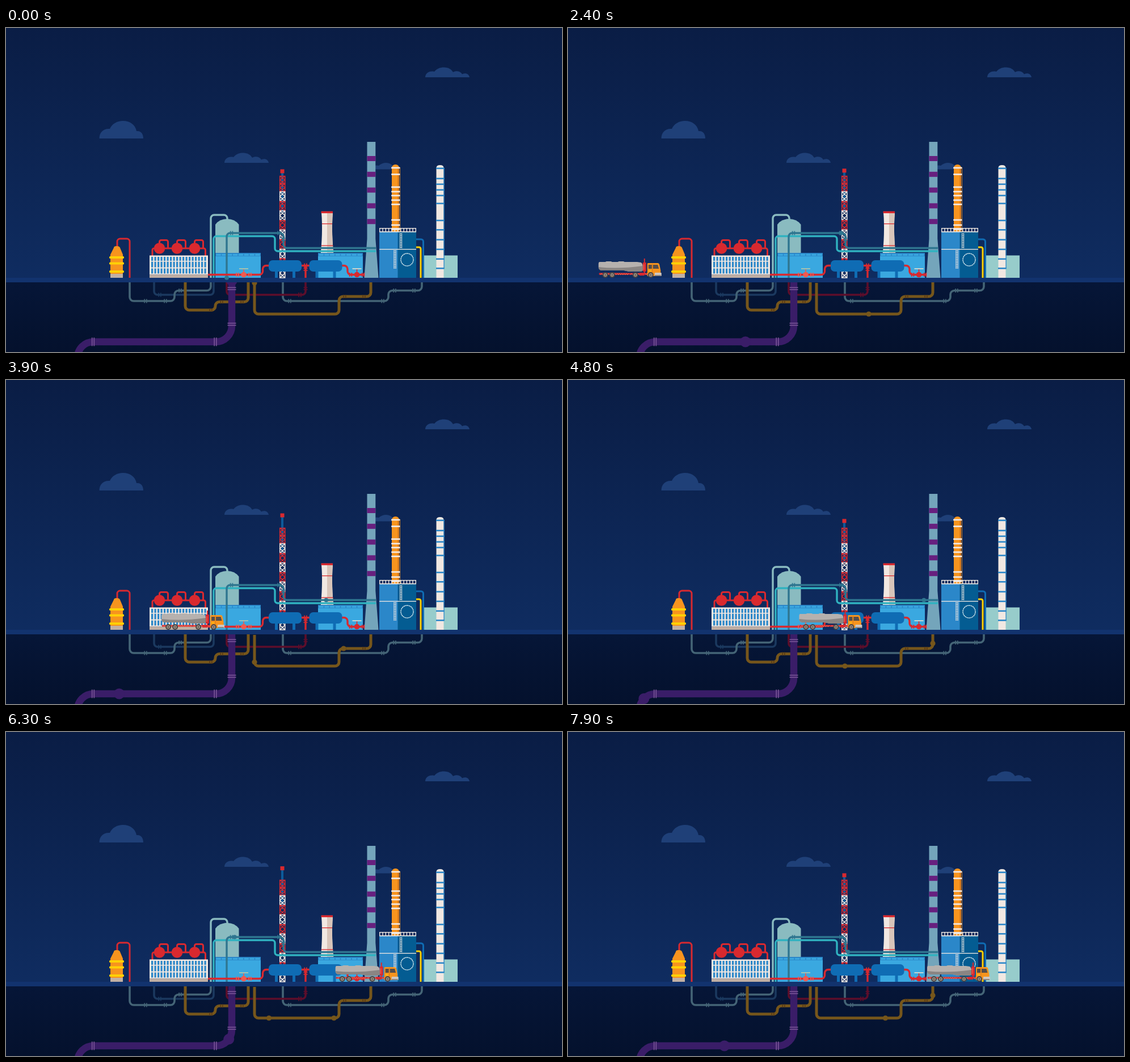
These frames come from a looping animation (980 px wide and 572 px high, 8 s). An HTML page:

```html
<!DOCTYPE html>
<html lang="en">
<head>
<meta charset="utf-8">
<title>Refinery</title>
<style>
html, body { margin: 0; width: 100%; height: 100%; overflow: hidden; background: #0a1e46; }
svg { display: block; }
</style>
</head>
<body>
<svg id="stage" width="980" height="572" viewBox="0 0 980 572"></svg>
<script>
const RED = '#d9292f', WHITE = '#f1e8e2', BLUE = '#2b87c9', DEEP = '#0f6cb4', SKY = '#3aa8e0',
  ORANGE = '#f7941e', YELLOW = '#ffd105', SAGE = '#8abbc0', CYAN = '#30b2c0', TEAL = '#2f7690',
  SLATE = '#446476', NAVY = '#1b395f', BROWN = '#76561b', WINE = '#5d0e2b', PURPLE = '#3a1d68',
  CLOUD = '#1f4078';

const range = (n, f) => Array.from({ length: n }, (_, i) => f(i)).join('');
const rect = (c, x, y, w, h, r = 0) => `<rect fill="${c}" x="${x}" y="${y}" width="${w}" height="${h}" rx="${r}"/>`;
const disc = (c, x, y, r) => `<circle fill="${c}" cx="${x}" cy="${y}" r="${r}"/>`;
const shape = (c, d) => `<path fill="${c}" d="${d}"/>`;
const line = (c, w, d) => `<path fill="none" stroke="${c}" stroke-width="${w}" d="${d}"/>`;

// Polyline with corners rounded by radius r
function bend(pts, r) {
  let d = 'M' + pts[0];
  for (let i = 1; i < pts.length - 1; i++) {
    const [x, y] = pts[i];
    const toward = ([px, py]) => [Math.sign(px - x), Math.sign(py - y)];
    const a = toward(pts[i - 1]), b = toward(pts[i + 1]);
    const sweep = a[0] * b[1] - a[1] * b[0] < 0 ? 1 : 0;
    d += `L${x + a[0] * r} ${y + a[1] * r}A${r} ${r} 0 0 ${sweep} ${x + b[0] * r} ${y + b[1] * r}`;
  }
  return d + 'L' + pts[pts.length - 1];
}
const pipe = (c, w, r, ...pts) => line(c, w, bend(pts, r));
const flangeX = (c, y, h, ...xs) => xs.map(x => rect(c, x - 2.7, y - h / 2, 1.8, h) + rect(c, x + .9, y - h / 2, 1.8, h)).join('');
const flangeY = (c, x, w, ...ys) => ys.map(y => rect(c, x - w / 2, y - 2.7, w, 1.8) + rect(c, x - w / 2, y + .9, w, 1.8)).join('');

const longCloud = (x, y) => `<g transform="translate(${x} ${y})">` + shape(CLOUD,
  'M0 0C0 -7 7 -12 16 -10C21 -16 27 -17.5 33 -17.5C41 -17.5 46 -14 49 -9C54 -12 62 -11 65 -5.500C71 -8.500 77 -6 78 0Z') + '</g>';

function clouds() {
  return shape(CLOUD, 'M164.500 195C164.500 184 172 177 183 178C187 169 196 164 206 164C219 164 228 171 230 182C238 181 242 187 242 195Z')
    + longCloud(385, 238) + longCloud(739, 87)
    + shape(CLOUD, 'M640 249.500Q646 241 657 243Q663 238 670 238Q678 238 682 244L690 249.500Z');
}

const purplePath = bend([[398, 446], [398, 554], [126, 554], [126, 600]], 28);
const brownPath = bend([[438, 450], [438, 505], [587, 505], [587, 474], [643, 474], [643, 446]], 7);
const tealPath = bend([[389, 441], [389, 362], [489, 362], [489, 388.5], [652, 388.5]], 6);

function underground() {
  const gray = x => pipe(SLATE, 3.6, 7, [x, 447], [x, 482], [x === 218 ? 297 : 674, 482],
    [x === 218 ? 297 : 674, 463.5], [x === 218 ? 361 : 733, 463.5], [x === 218 ? 361 : 733, 447]);
  return rect('url(#soil)', 0, 441, 980, 131)
    + pipe(NAVY, 3.6, 6, [261, 447], [261, 471], [366, 471], [366, 447]) + flangeX(NAVY, 471, 7, 271)
    + gray(218) + flangeX(SLATE, 482, 7, 246, 281) + flangeX(SLATE, 463.5, 7, 307)
    + gray(488) + flangeX(SLATE, 482, 7, 500, 664) + flangeX(SLATE, 463.5, 7, 685, 719)
    + pipe(WINE, 3.6, 6, [389, 441], [389, 471], [528, 471], [528, 441])
    + flangeX(WINE, 471, 8, 518) + flangeY(WINE, 528, 7, 460)
    + pipe(BROWN, 5, 7, [316, 447], [316, 498], [369, 498], [369, 483.5], [427, 483.5], [427, 447])
    + flangeX('#593b18', 498, 6, 361) + flangeX('#593b18', 483.5, 6, 380, 416)
    + line(BROWN, 5, brownPath) + flangeX('#593b18', 474, 6, 597, 631)
    + '<g id="brown"></g>'
    + line(PURPLE, 12.5, purplePath) + '<g id="purple"></g>'
    + flangeY('#765294', 398, 15, 460, 523) + flangeX('#765294', 554, 15, 153.5, 369);
}

function capsule() {
  return pipe(RED, 3, 5, [196, 388], [196, 372], [218, 372], [218, 441])
    + shape(ORANGE, 'M190 388Q190 385 195 385Q200 385 201 388L206 400V434H184V400Z')
    + [403, 413.5, 428].map(y => rect(YELLOW, 182, y, 26, 4, 1.5)).join('')
    + rect('#c2b0a4', 184, 434, 22, 7);
}

function factory() {
  const rows = [[404, 7], [412.5, 10], [424.5, 9]];
  return pipe(RED, 3, 3, [258, 402], [258, 389], [351.5, 389], [351.5, 402])
    + [270.5, 301.5, 332.5].map(x =>
      pipe(RED, 3, 3, [x, 385], [x, 374.5], [x + 15, 374.5], [x + 15, 389]) + disc(RED, x, 389, 9.8)).join('')
    + rect(WHITE, 253, 401.5, 103, 34) + rect('#bfaea3', 253, 435.5, 103, 5.5)
    + rows.map(([y, h]) => range(18, i => rect(BLUE, 256 + i * 5.5, y, 3.2, h))).join('');
}

const shed = (x, w) => rect(SKY, x, 397, w, 44) + rect(BLUE, x, 397, w, 2)
  + rect(BLUE, x, 402, w, 1) + range(9, i => rect(BLUE, x + i * (w - 1.5) / 8, 397, 1.5, 6));

function coolingChimney() {
  return shape(WHITE, 'M556 326H576C574 350 575 380 578 404H554C557 380 558 350 556 326Z')
    + shape('#d8c5ba', 'M566 326H576C574 350 575 380 578 404H566Z')
    + rect(RED, 555.5, 323.5, 20.500, 3.5) + rect(RED, 557, 345, 18, 1.3) + rect(RED, 556, 383.500, 20.500, 1.3);
}

const stripedStack = () => shape('#74a5bb', 'M636.500 201H651.300V372L656.500 441H631.500L636.500 372Z')
  + range(5, i => rect('#67207f', 636.500, 226 + i * 27.8, 14.8, 9));

function reactor() {
  const ladder = (x, y, h) => rect(WHITE, x - 2, y, .9, h) + rect(WHITE, x + 1.2, y, .9, h)
    + range(Math.floor(h / 3), i => rect(WHITE, x - 2, y + 1 + i * 3, 4, .8));
  return rect(ORANGE, 680, 241, 13, 120, 6) + rect(ORANGE, 680, 300, 13, 61) + rect('#e07f1b', 690, 248, 3, 112)
    + rect(ORANGE, 694, 246, .8, 114)
    + [245.5, 257, 279.5, 287.5, 294.5, 302.5, 310, 337.500, 346.5, 354].map(y => rect(WHITE, 679, y, 15.5, 2.8, 1)).join('')
    + pipe(DEEP, 3, 4, [722, 373], [735.5, 373], [735.5, 441])
    + pipe(YELLOW, 3, 3, [722, 387], [731, 387], [731, 441])
    + rect(BLUE, 658, 360, 33, 81) + rect('#045c92', 690.5, 360, 32.5, 81)
    + rect(WHITE, 658, 353, 65, 1.4) + rect(WHITE, 658, 359, 65, 1.6)
    + range(13, i => rect(WHITE, 658 + i * 5.3, 353, 1.4, 7))
    + rect(WHITE, 658, 390, 65, 1.3)
    + ladder(696, 362, 27) + ladder(685.5, 392, 33)
    + '<circle cx="707" cy="409" r="11" fill="none" stroke="#dcebf0" stroke-width="1.4" stroke-dasharray="2.6 .6"/>';
}

function whiteColumn() {
  return rect('#97cccb', 737, 401.5, 59, 39.5)
    + shape(WHITE, 'M758.500 441V247Q758.500 242 765 242Q771.500 242 771.500 247V441Z')
    + [246.500, 264.500, 274.500, 284.500, 294.500, 308.5, 338.5, 355, 372.5, 389.5, 406.5, 423].map(y => rect(BLUE, 758, y, 14.5, 2.6)).join('')
    + rect(BLUE, 771.5, 247, 1.2, 178);
}

function rig() {
  const cell = (c, y, h) => line(c, 1.5, `M482.700 ${y}H491.800V${y + h}H482.700ZL491.800 ${y + h / 2}L482.700 ${y + h}M491.800 ${y}L482.700 ${y + h / 2}L491.800 ${y + h}`);
  return '<g id="rod">' + rect('#0d5b9b', 485, 6, 4, 70) + rect(RED, 483.5, 0, 7, 7) + '</g>'
    + cell(RED, 261.5, 13.500) + cell(RED, 275, 13.500)
    + range(9, i => cell(i % 2 ? RED : WHITE, 289 + i * 16.9, 16.9));
}

function tanks() {
  const tank = x => rect(DEEP, x + 11, 428, 5, 13) + rect(DEEP, x + 42, 428, 5, 13) + rect(DEEP, x, 410, 58, 20, 7);
  const valve = (x, c, h) => disc(c, x, 435.5, 4.8) + rect(c, x - .8, 426, 1.6, 8) + rect(h, x - 8, 424, 16, 2)
    + flangeX(c, 435.5, 7, x - 11, x + 11);
  return pipe(RED, 3.4, 6, [356, 435.5], [452.5, 435.5], [452.5, 419.5], [466, 419.5])
    + pipe(RED, 3.4, 3, [518, 419.5], [538, 419.5]) + pipe(RED, 3.4, 3, [528, 419.5], [528, 441])
    + pipe(RED, 3.4, 6, [588, 419.5], [602, 419.5], [602, 435.5], [632, 435.5])
    + flangeX(RED, 419.5, 8, 528) + flangeY(RED, 528, 7, 426)
    + valve(419, '#ef5a50', '#9fc3b5') + valve(618.5, RED, '#c3d5d2')
    + tank(463) + tank(534.500);
}

// Drawn with its rear bumper at x = 0 and its nose at x = 111
function truck() {
  const wheel = x => disc('#4b4644', x, 436, 5) + disc('#9c8f84', x, 436, 3) + disc('#5c5450', x, 436, 1.3);
  return rect(RED, 1, 432.500, 105, 3)
    + line('#f26a4c', 1, 'M3 436' + range(25, i => `l2 ${i % 2 ? 3 : -3}`) + 'M56 436' + range(22, i => `l2 ${i % 2 ? 3 : -3}`))
    + rect(RED, 72, 432, 9, 5) + rect(RED, 80, 407, 2, 28) + rect(RED, 78, 414, 6, 16, 1)
    + rect('#f2765a', 79.5, 417, 1, 10)
    + shape('#b6b1ae', 'M2 413H12L14 412H22L24 413H34L36 412H44L46 413H68L75 414Q78 416 78 421V427Q78 430 73 430H54L45 428H5Q0 427 0 422V417Q0 413 2 413Z')
    + shape('#8a8583', 'M0 422Q35 426 78 420V427Q78 430 73 430H54L45 428H5Q0 427 0 422Z')
    + shape(ORANGE, 'M86 416Q86 415 88 415H104Q107 415 107.500 418L109.500 428V438H86Z')
    + shape('#564d49', 'M88 418H94V425H88ZM96 418H104.500L106.500 425H96Z')
    + rect('#d97a17', 94.5, 416, .9, 21) + rect(YELLOW, 88, 428, 5, 1.3)
    + rect('#cfc8c3', 99, 432, 12, 6, 1) + rect('#91877f', 99, 436, 11, 2)
    + [12, 24, 65, 92].map(wheel).join('');
}

const grad = (id, a, b) => `<linearGradient id="${id}" x1="0" y1="0" x2="0" y2="1"><stop stop-color="${a}"/><stop offset="1" stop-color="${b}"/></linearGradient>`;
const stage = document.getElementById('stage');
stage.innerHTML = '<defs>' + grad('sky', '#0a1d45', '#0f2c60') + grad('soil', '#061638', '#04112d') + '</defs>'
  + rect('url(#sky)', 0, 0, 980, 441) + clouds()
  + underground() + rect('#12336e', 0, 441, 980, 8)
  + capsule() + factory()
  + pipe(SAGE, 3.4, 6, [361, 441], [361, 330], [390, 330], [390, 340])
  + shape(SAGE, 'M369 404V347Q376 337 390 337Q403 337 410.500 347V404Z')
  + shed(369, 80) + coolingChimney() + shed(550, 79) + stripedStack()
  + whiteColumn() + reactor() + rig()
  + pipe(CYAN, 3.4, 5, [366, 441], [366, 367.5], [474, 367.5], [474, 394], [652, 394])
  + line(TEAL, 3.4, tealPath) + flangeX(TEAL, 362, 7, 397.5, 481) + flangeY(TEAL, 489, 7, 373)
  + '<g id="teal"></g>' + tanks()
  + '<g id="truck">' + truck() + '</g>';

const part = id => document.getElementById(id);
const move = (el, x, y) => el.setAttribute('transform', `translate(${x} ${y})`);

// Bulges that travel through a pipe, one for each start time
function flow(id, d, color, r, speed, starts) {
  const track = document.createElementNS('http://www.w3.org/2000/svg', 'path');
  track.setAttribute('d', d);
  const length = track.getTotalLength();
  part(id).innerHTML = starts.map(() => disc(color, 0, 0, r)).join('');
  const dots = [...part(id).children];
  return t => dots.forEach((dot, i) => {
    const s = (t - starts[i]) / 1000 * speed;
    const on = s >= 0 && s <= length;
    dot.style.display = on ? '' : 'none';
    if (on) { const p = track.getPointAtLength(s); move(dot, p.x, p.y); }
  });
}
const flows = [
  flow('purple', purplePath, PURPLE, 9.5, 75.5, [0, 5010]),
  flow('brown', brownPath, BROWN, 4.6, 60, [0, 3100, 5010]),
  flow('teal', tealPath, TEAL, 3.8, 70, [0, 5010]),
];

function draw(now) {
  const t = now % 8000;
  const p = Math.min(t / 7500, 1);
  move(part('truck'), -131 + 764 * p * p * (3 - 2 * p), 0);
  move(part('rod'), 0, 242.4 + 7 * Math.cos(t / 2640 * 2 * Math.PI));
  flows.forEach(f => f(t));
  requestAnimationFrame(draw);
}
draw(performance.now());
</script>
</body>
</html>
```
